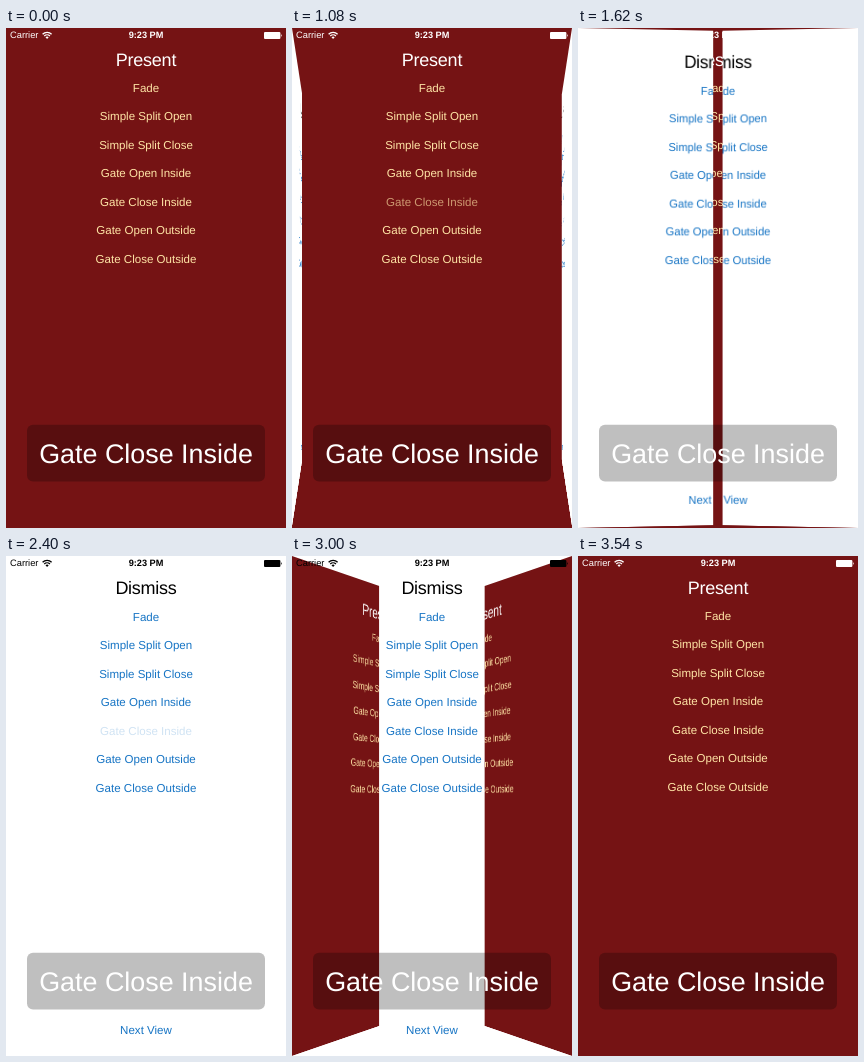
These frames come from a looping animation (280x500 px, 3600 ms). An HTML page:

```html
<!DOCTYPE html>
<html lang="en">
<head>
<meta charset="utf-8">
<style>
  html, body { margin: 0; width: 100%; height: 100%; overflow: hidden; }
  #stage { position: relative; width: 280px; height: 500px; overflow: hidden; }
  svg { position: absolute; left: 0; top: 0; width: 280px; height: 500px; }
  text {
    font: 11.55px "Liberation Sans", Arial, sans-serif;
    text-anchor: middle;
    text-rendering: geometricPrecision;
  }
  .title { font-size: 18px; letter-spacing: -.25px; }
  .present { background: #751314; fill: #ffe5a6; }
  .present .title { fill: #fff; }
  .dismiss { background: #fff; fill: #1674c4; }
  .dismiss .title { fill: #000; }
  .left { clip-path: inset(0 50% 0 0); transform-origin: 0 50%; }
  .right { clip-path: inset(0 0 0 50%); transform-origin: 100% 50%; }
  #toast, #status { z-index: 2; }
  #toast text { font-size: 26.9px; fill: #fff; }
  #status text { font-size: 9.3px; }
  #status .clock { font-size: 9.2px; font-weight: bold; }
</style>
</head>
<body>
<div id="stage"></div>
<script>
const LOOP = 3600, DURATION = 950, DEPTH = 360;
const PRESS = 125, RELEASE_FADE = 310;
const OPEN_AT = 913, CLOSE_AT = 2525;
const stage = document.getElementById('stage');
const items = ['Fade', 'Simple Split Open', 'Simple Split Close', 'Gate Open Inside',
  'Gate Close Inside', 'Gate Open Outside', 'Gate Close Outside'];

const label = (text, y, cls = '') => `<text x="140" y="${y}" class="${cls}">${text}</text>`;

function addSvg(content, cls, id = '') {
  stage.insertAdjacentHTML('beforeend', `<svg id="${id}" class="${cls}">${content}</svg>`);
  return stage.lastElementChild;
}

function makeScreen(name, title, firstY, extra = '') {
  const content = label(title, 38.2, 'title') +
    items.map((item, i) => label(item, firstY + 28.5 * i, item === 'Gate Close Inside' ? 'tapped' : '')).join('') +
    extra;
  const [base, left, right] = ['', 'left', 'right'].map(side => addSvg(content, `${name} ${side}`));
  return { base, left, right, tapped: base.querySelector('.tapped') };
}

const present = makeScreen('present', 'Present', 63.8);
const dismiss = makeScreen('dismiss', 'Dismiss', 64.6, label('Next View', 478.2));
// The present gates fold in front of the dismiss base.
present.left.style.zIndex = present.right.style.zIndex = 1;

addSvg('<rect x="21" y="396.7" width="238" height="56.8" rx="6" fill-opacity=".25"/>' +
  label('Gate Close Inside', 435), '', 'toast');

const status = addSvg(`
  <text x="4" y="10.3" style="text-anchor:start">Carrier</text>
  <path d="M36.6 6.2a6.4 6.4 0 0 1 9 0M38.3 8a4 4 0 0 1 5.6 0" fill="none" stroke="currentColor" stroke-width="1.4"/>
  <path d="M41.1 11l-1.6-1.8a2.3 2.3 0 0 1 3.2 0z"/>
  <text x="140" y="10.3" class="clock">9:23 PM</text>
  <rect x="258" y="4" width="16.4" height="7" rx="1"/>
  <path d="M275 6q1.6 1.5 0 3z"/>`, '', 'status');

const clamp = v => Math.min(1, Math.max(0, v));

// cubic-bezier(.42, 0, .58, 1)
function easeInOut(x) {
  let lo = 0, hi = 1;
  for (let i = 0; i < 24; i++) {
    const u = (lo + hi) / 2, v = 1 - u;
    if (3 * v * u * (.42 * v + .58 * u) + u ** 3 < x) lo = u; else hi = u;
  }
  return lo * lo * (3 - 2 * lo);
}

const show = (el, on) => el.style.display = on ? '' : 'none';

// Angle and perspective strength both shrink to zero as the gate closes.
function setGates(screen, progress) {
  const remaining = 1 - easeInOut(progress);
  const visible = progress > 0 && progress < 1;
  for (const [side, sign] of [['left', 1], ['right', -1]]) {
    show(screen[side], visible);
    if (visible) screen[side].style.transform =
      `perspective(${DEPTH / remaining}px) rotateY(${sign * 90 * remaining}deg)`;
  }
}

function setTap(screen, sinceRelease) {
  const pressed = sinceRelease >= -PRESS;
  screen.tapped.style.opacity = pressed ? .2 + .8 * clamp(sinceRelease / RELEASE_FADE) : 1;
}

function render(t) {
  const opening = clamp((t - OPEN_AT) / DURATION);
  const closing = clamp((t - CLOSE_AT) / DURATION);
  const onDismiss = opening === 1 && closing < 1;
  show(present.base, !onDismiss);
  show(dismiss.base, onDismiss);
  setGates(dismiss, opening);
  setGates(present, closing);
  setTap(present, t - OPEN_AT);
  setTap(dismiss, t - CLOSE_AT);
  status.style.fill = status.style.color = onDismiss ? '#000' : '#fff';
}

function tick() {
  render(performance.now() % LOOP);
  requestAnimationFrame(tick);
}
tick();
</script>
</body>
</html>
```
